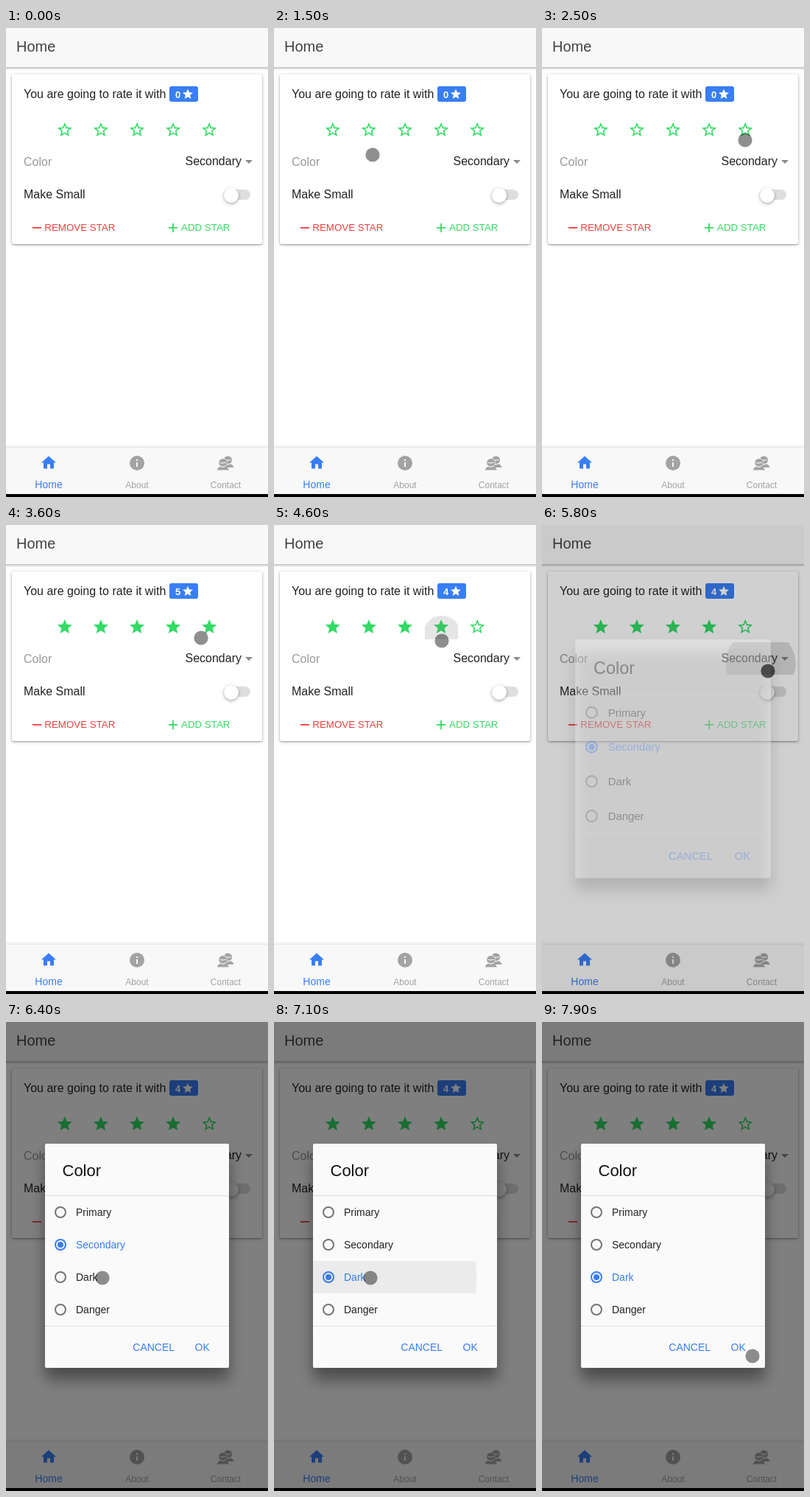
Animation, 356 px wide and 636 px high, one loop 8000 ms. Source, as an HTML page with a canvas:

```html
<!DOCTYPE html>
<html lang="en">
<head>
<meta charset="utf-8">
<title>Star rating</title>
<style>
  html, body { margin: 0; width: 100%; height: 100%; overflow: hidden; background: #fff; }
  canvas { display: block; width: 356px; height: 636px; }
</style>
</head>
<body>
<canvas id="stage" width="356" height="636"></canvas>
<script>
const ctx = document.getElementById('stage').getContext('2d');
const W = 356, H = 636, LOOP = 8000;
const BLUE = '#387ef5', GREEN = '#32db64', RED = '#f53d3d', MUTED = '#a3a3a3';
const FONT = '"Liberation Sans", Arial, sans-serif';

const STAR = new Path2D('M12 17.27L18.18 21l-1.64-7.03L22 9.24l-7.19-.61L12 2 9.19 8.63 2 9.24l5.46 4.73L5.82 21z');
const STAR_LINE = new Path2D('M22 9.24l-7.19-.62L12 2 9.19 8.63 2 9.24l5.46 4.73L5.82 21 12 17.27 18.18 21l-1.63-7.03L22 9.24zM12 15.4l-3.76 2.27 1-4.28-3.32-2.88 4.38-.38L12 6.1l1.71 4.04 4.38.38-3.32 2.88 1 4.28L12 15.4z');
const HOUSE = new Path2D('M10 20v-6h4v6h5v-8h3L12 3 2 12h3v8z');

const RATE = [[2700, 5], [4400, 4]];
const OPEN_AT = 5719, PICK_AT = 6750;
const PRESSES = [2680, 4390, 5690, 6740];

// Pointer stops: time, x, y
const PATH = [
  [1140, 152, 650], [1300, 140, 310], [1400, 134, 186], [1500, 134, 172],
  [1900, 186, 160], [2450, 276, 152], [3400, 276, 152], [4050, 228, 157],
  [4800, 228, 157], [5400, 307, 198], [5900, 307, 198], [6370, 131, 347],
  [7200, 131, 347], [7600, 126, 396], [7880, 286, 453]
];

// Ripples: start, duration, centre, reach, clip box
const RIPPLES = [
  [2690, 400, 276, 148, 50, [254, 119, 45, 36]],
  [4400, 400, 228, 148, 50, [205, 119, 45, 36]],
  [5690, 700, 297, 188, 300, [8, 159, 340, 44]]
];
const OPTION_RIPPLE = [6740, 500, 131, 347, 200, [53, 324, 250, 44]];

const clamp = v => Math.max(0, Math.min(1, v));
const smooth = v => { v = clamp(v); return v * v * (3 - 2 * v); };

function rect(x, y, w, h, color, r = 0) {
  ctx.fillStyle = color;
  ctx.beginPath();
  ctx.roundRect(x, y, w, h, r);
  ctx.fill();
}

function circle(x, y, r, color) {
  ctx.fillStyle = color;
  ctx.beginPath();
  ctx.arc(x, y, r, 0, Math.PI * 2);
  ctx.fill();
}

function text(str, x, y, size, color, align = 'left', weight = '') {
  ctx.font = `${weight} ${size}px ${FONT}`;
  ctx.textAlign = align;
  ctx.fillStyle = color;
  ctx.fillText(str, x, y);
}

function icon(path, x, y, color, scale = 1) {
  ctx.save();
  ctx.translate(x, y);
  ctx.scale(scale, scale);
  ctx.fillStyle = color;
  ctx.fill(path, 'evenodd');
  ctx.restore();
}

function shadowed(x, y, w, h, color, r, dy, blur, alpha) {
  ctx.save();
  ctx.shadowColor = `rgba(0,0,0,${alpha})`;
  ctx.shadowOffsetY = dy;
  ctx.shadowBlur = blur;
  rect(x, y, w, h, color, r);
  ctx.restore();
}

function fade(y0, y1, a0, a1) {
  const g = ctx.createLinearGradient(0, y0, 0, y1);
  g.addColorStop(0, `rgba(0,0,0,${a0})`);
  g.addColorStop(1, `rgba(0,0,0,${a1})`);
  rect(0, y0, W, y1 - y0, g);
}

function ripple([start, dur, x, y, reach, box], t) {
  const p = (t - start) / dur;
  if (p <= 0 || p >= 1) return;
  ctx.save();
  ctx.beginPath();
  ctx.rect(...box);
  ctx.clip();
  ctx.globalAlpha *= 0.2 * (1 - p * p);
  circle(x, y, reach * p, '#555');
  ctx.restore();
}

function header() {
  rect(0, 0, W, 53, '#f8f8f8');
  fade(53, 57, 0.26, 0);
  text('Home', 14, 32, 20, '#424242');
}

function card(t) {
  shadowed(8, 63, 340, 230, '#fff', 2, 1, 5, 0.2);
  shadowed(8, 63, 340, 230, '#fff', 2, 1, 2, 0.3);

  const rating = RATE.reduce((r, [at, n]) => t >= at ? n : r, 0);
  text('You are going to rate it with', 24, 95, 16, '#222');
  rect(222, 79, 39, 21, BLUE, 3);
  text(rating, 230, 95, 13, '#fff', 'left', 'bold');
  icon(STAR, 238.6, 81.3, '#fff', 0.7);

  for (let i = 0; i < 5; i++) {
    icon(i < rating ? STAR : STAR_LINE, 67.8 + i * 49.1, 126, GREEN);
  }

  text('Color', 24, 187, 16, '#999');
  text('Secondary', 243.5, 186, 16, '#222');
  ctx.fillStyle = '#8a8a8a';
  ctx.beginPath();
  ctx.moveTo(325, 179);
  ctx.lineTo(335, 179);
  ctx.lineTo(330, 184);
  ctx.fill();

  text('Make Small', 24, 231, 16, '#222');
  rect(296, 219, 36, 14, '#dedede', 7);
  shadowed(296, 217, 20, 20, '#fff', 10, 1.5, 4, 0.35);

  rect(36, 270, 12, 1.8, RED);
  text('REMOVE STAR', 52.3, 275, 13.333, RED);
  rect(221, 270, 12, 1.8, GREEN);
  rect(226.1, 265, 1.8, 12, GREEN);
  text('ADD STAR', 238, 275, 13.333, GREEN);
}

function person(x, y) {
  circle(x, y, 5.6, MUTED);
  ctx.beginPath();
  ctx.moveTo(x - 8, y + 10);
  ctx.quadraticCurveTo(x - 7, y + 6, x - 3, y + 5);
  ctx.lineTo(x + 3, y + 5);
  ctx.quadraticCurveTo(x + 7, y + 6, x + 8, y + 10);
  ctx.fill();
  ctx.strokeStyle = '#f8f8f8';
  ctx.lineWidth = 1.1;
  ctx.beginPath();
  ctx.moveTo(x - 4.2, y);
  ctx.quadraticCurveTo(x, y + 1, x + 4.2, y - 0.6);
  ctx.moveTo(x - 3.6, y + 4.2);
  ctx.quadraticCurveTo(x, y + 7.5, x + 3.6, y + 4.2);
  ctx.stroke();
}

function tabs() {
  fade(564, 568, 0, 0.05);
  rect(0, 568, W, 64, '#f8f8f8');
  rect(0, 568, W, 1, '#e6e6e6');
  icon(HOUSE, 46, 577.5, BLUE);
  text('Home', 58, 624, 14, BLUE, 'center');

  circle(178, 590, 10, MUTED);
  rect(177, 589, 2, 6, '#f8f8f8');
  rect(177, 585, 2, 2, '#f8f8f8');
  text('About', 178, 624, 12, MUTED, 'center');

  person(301.5, 586);
  circle(294.5, 589.5, 6.4, '#f8f8f8');
  person(294.8, 589.5);
  text('Contact', 298.5, 624, 12, MUTED, 'center');
}

function radio(label, y, dot) {
  const on = dot > 0;
  ctx.strokeStyle = on ? BLUE : '#757575';
  ctx.lineWidth = 2;
  ctx.beginPath();
  ctx.arc(74, y, 7, 0, Math.PI * 2);
  ctx.stroke();
  if (on) circle(74, y, 4 * dot, BLUE);
  text(label, 95, y + 5, 14, on ? BLUE : '#222');
}

function dialog(t) {
  const p = smooth((t - OPEN_AT) / 200);
  if (p <= 0) return;
  rect(0, 0, W, 632, `rgba(0,0,0,${0.5 * p})`);

  const scale = 1.1 - 0.1 * p;
  ctx.save();
  ctx.globalAlpha = p;
  ctx.translate(178, 317);
  ctx.scale(scale, scale);
  ctx.translate(-178, -317);
  shadowed(53, 165, 250, 304, '#fafafa', 2, 16, 20, 0.4);
  text('Color', 76.5, 209, 22, '#111');
  rect(53, 235, 250, 1, '#dedede');
  rect(53, 412, 250, 1, '#dedede');

  const picked = t >= PICK_AT;
  const dots = [0, picked ? 0 : 1, smooth((t - PICK_AT) / 200), 0];
  ['Primary', 'Secondary', 'Dark', 'Danger'].forEach((name, i) => radio(name, 258 + i * 44, dots[i]));
  ripple(OPTION_RIPPLE, t);

  text('CANCEL', 172.3, 446, 14, BLUE);
  text('OK', 256.6, 446, 14, BLUE);
  ctx.restore();
}

function pointer(t) {
  if (t < PATH[0][0]) return;
  let i = 0;
  while (i < PATH.length - 2 && t >= PATH[i + 1][0]) i++;
  const [t0, x0, y0] = PATH[i], [t1, x1, y1] = PATH[i + 1];
  const p = (t - t0) / (t1 - t0);
  const k = i < 2 ? clamp(p) : smooth(p);
  const down = PRESSES.some(at => t >= at && t < at + 150);
  circle(x0 + (x1 - x0) * k, y0 + (y1 - y0) * k, 9.6, `rgba(0,0,0,${down ? 0.62 : 0.44})`);
}

function draw(t) {
  rect(0, 0, W, H, '#fff');
  header();
  card(t);
  RIPPLES.forEach(r => ripple(r, t));
  tabs();
  dialog(t);
  pointer(t);
  rect(0, 632, W, 4, '#000');
}

const begin = performance.now();
function tick() {
  draw((performance.now() - begin) % LOOP);
  requestAnimationFrame(tick);
}
tick();
</script>
</body>
</html>
```
